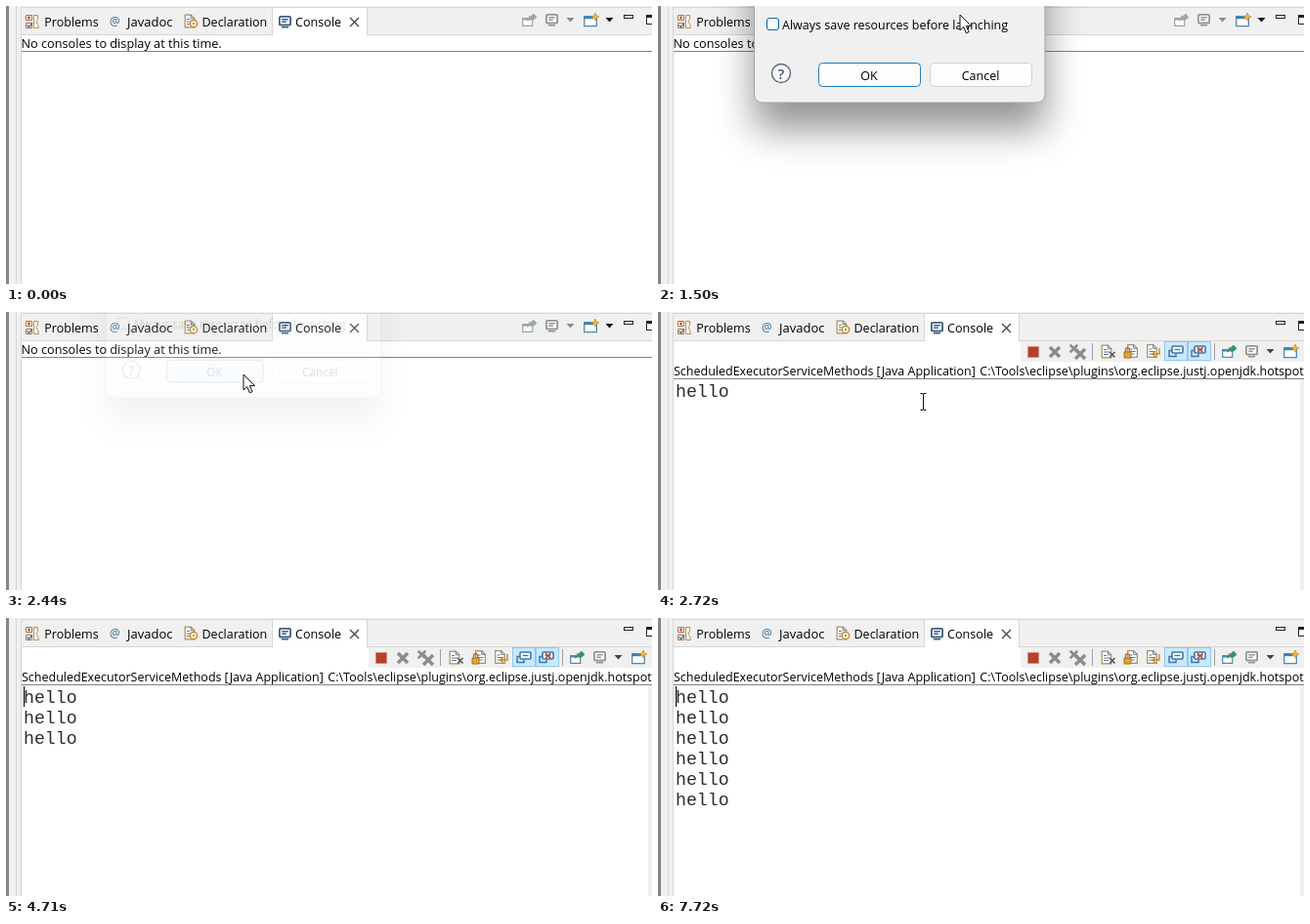
An HTML page for the animation above (8000 ms loop, 661 by 285 pixels).

```html
<!DOCTYPE html>
<html lang="en">
<head>
<meta charset="utf-8">
<title>Console output</title>
<style>
  html, body { margin: 0; width: 100%; height: 100%; overflow: hidden; background: #fff; }
  svg { display: block; }
  text { font: 12.5px "Open Sans", "Noto Sans", sans-serif; fill: #000; white-space: pre; }
  .mono { font: 18.2px "Liberation Mono", monospace; fill: #2c2c2c; }
  .mid { text-anchor: middle; }
  .crisp { shape-rendering: crispEdges; }
  .line { fill: none; stroke-width: 1.4; }
</style>
</head>
<body>
<svg width="661" height="285" viewBox="0 0 661 285">
  <defs>
    <g id="monitor">
      <rect x=".9" y=".9" width="11.2" height="8.6" rx="1" fill="#fff" stroke="currentColor" stroke-width="1.8"/>
      <path d="M3.2 3.7h6.6M3.2 6.3h4.6M3 11.8h7" class="line" stroke="currentColor"/>
    </g>
    <g id="linkedMonitor" color="#3f78a8">
      <rect x="4" y="1" width="11" height="7" rx="1" fill="#fff" stroke="currentColor" stroke-width="1.6"/>
      <path d="M6.5 4.5h6" class="line" stroke="currentColor"/>
      <path d="M4 5.5H1v6h7v-3" fill="none" stroke="currentColor" stroke-width="1.5"/>
    </g>
    <g id="page">
      <path d="M.7 .7h6l3.6 3.6v9H.7z" fill="#fff" stroke="#a88f5c" stroke-width="1.2"/>
      <path d="M6.7 .7v3.6h3.6M2.5 5h3M2.5 7.5h6M2.5 10h5" fill="none" stroke="#55799f"/>
    </g>
    <g id="pin">
      <path d="M.7 4.5h10v7.8H.7z" fill="#fff" stroke="currentColor" stroke-width="1.2"/>
      <path d="M1 5.5h9" stroke="currentColor" stroke-width="2"/>
      <path d="M5 7l3-2M7 2.5l3.5 4M9 3l3-2.5 2.5 3L11.5 6z" fill="var(--head)" stroke="var(--head)" stroke-width="1.2"/>
    </g>
    <g id="newConsole">
      <path d="M.7 2.7h12.6v10H.7z" fill="#fff" stroke="#4f87b0" stroke-width="1.3"/>
      <path d="M1 4h9" stroke="#3f7fae" stroke-width="2.4"/>
      <path d="M12 -1l1.2 2.8L16 3l-2.8 1.2L12 7l-1.2-2.8L8 3l2.8-1.2z" fill="#f0b93a" stroke="#c98a1c" stroke-width=".7"/>
    </g>
    <path id="drop" d="M0 0h8L4 4.5z"/>
    <path id="cross" d="M1 1l10 10M11 1L1 11" stroke="#8c8c8c" stroke-width="3.4"/>
    <path id="smallCross" d="M0 0l5.5 5.5M5.5 0L0 5.5" stroke-width="1.7"/>
  </defs>

  <!-- window frame and tabs -->
  <g class="crisp">
    <path d="M0 0h661v30H16v255H0z" fill="#f0f0f0"/>
    <path d="M0 0h3v285H0z" fill="#858585"/>
    <path d="M10 0h1v285h-1zM15 1h1v284h-1zM15 1h646v1H15zM16 29h645v1H16z" fill="#d6d6d6"/>
    <path d="M272 1h98v29h-98z" fill="#d6d6d6"/>
    <path d="M273 2h96v28h-96z" fill="#fff"/>
    <path d="M632 9h10v4h-10zM655 9h8v10h-8z" fill="#222"/>
    <path d="M633 10h8v2h-8zM656 12h8v6h-8z" fill="#fff"/>
  </g>
  <path d="M20.5 9.5h6v5h-6zM20.5 17.5h6v5h-6z" fill="#fff" stroke="#b5713f"/>
  <path d="M22 12h3M23.5 10.500v3" stroke="#c4552f" stroke-width="1.5"/>
  <path d="M21.500 19.500l2 2 3.500-4" class="line" stroke="#476f9f"/>
  <path d="M28.500 9.500h4v4q-3 2 0 5l1 4h-5z" fill="#fff" stroke="#b8904a"/>
  <text x="39.3" y="21">Problems</text>
  <text x="106" y="20" style="font-size:12px;fill:#2f6c9e">@</text>
  <text x="124" y="21" style="font-size:13px">Javadoc</text>
  <use href="#page" x="182.5" y="8.5"/>
  <circle cx="192" cy="18" r="3.6" fill="#fff" stroke="#c58b24" stroke-width="1.5"/>
  <circle cx="192" cy="18" r="1.2" fill="#c58b24"/>
  <text x="200.5" y="21">Declaration</text>
  <use href="#monitor" x="279" y="10" color="#3f5f80"/>
  <text x="296" y="21" style="font-size:12.6px">Console</text>
  <path d="M352 12l9 9M361 12l-9 9" stroke="#444" stroke-width="1.3"/>

  <g id="empty">
    <g style="--head:#9aa7ae"><use href="#pin" x="528" y="8" color="#9aa3a8"/></g>
    <use href="#monitor" x="552" y="8" color="#949494"/>
    <use href="#drop" x="573.5" y="12" fill="#8a8a8a"/>
    <use href="#newConsole" x="591" y="8"/>
    <use href="#drop" x="613.5" y="12" fill="#111"/>
    <text x="15.5" y="43" style="font-size:12.7px">No consoles to display at this time.</text>
    <path class="crisp" d="M16 46h645v1H16z" fill="#828282"/>
  </g>

  <g id="console">
    <g class="crisp">
      <path d="M16 30h355v21H16z" fill="#fff"/>
      <path d="M371 30h290v21H371zM657 69h4v216h-4z" fill="#f0f0f0"/>
      <path d="M16 68h645v1H16z" fill="#828282"/>
      <path d="M444 32h1v17h-1zM569 32h1v17h-1z" fill="#a0a0a0"/>
      <path d="M518.5 30.5h23v19h-23zM542.5 30.5h23v19h-23z" fill="#cce8ff" stroke="#90c8f6"/>
      <path d="M378 35h12v12h-12z" fill="#d98a78"/>
      <path d="M379 36h10v10h-10z" fill="#b5402c"/>
    </g>
    <use href="#cross" x="400" y="35"/>
    <use href="#cross" transform="translate(421 33) scale(.75)"/>
    <use href="#cross" x="426" y="37"/>
    <use href="#page" x="453.5" y="33.5"/>
    <use href="#smallCross" x="462" y="41" stroke="#5a5a5a"/>
    <use href="#page" x="480" y="33"/>
    <path d="M477 41h7v6h-7z" fill="#e4a43a" stroke="#a9701c"/>
    <path d="M478.5 41v-3q2-3 4 0v3" class="line" stroke="#a9701c"/>
    <use href="#page" x="500" y="33"/>
    <path d="M506 43h7v-6M509 40l-3 3 3 3" class="line" stroke="#c08a28"/>
    <use href="#linkedMonitor" x="522" y="34"/>
    <use href="#linkedMonitor" x="545" y="34"/>
    <use href="#smallCross" x="552" y="36" stroke="#c24c38"/>
    <g style="--head:#38915d"><use href="#pin" x="577" y="34" color="#4f87b0"/></g>
    <use href="#monitor" x="601" y="34" color="#949494"/>
    <use href="#drop" x="622.5" y="38" fill="#444"/>
    <use href="#newConsole" x="640" y="34"/>
    <text y="65"><tspan x="16">ScheduledExecutorServiceMethods</tspan><tspan x="223.5">[Java Application]</tspan><tspan x="329.3">C:\Tools\eclipse\plugins\org.eclipse.justj.openjdk.hotspot</tspan></text>
    <g id="output"></g>
    <path id="caret" class="crisp" d="M18 70h1v21h-1z"/>
  </g>

  <g id="dialog">
    <rect x="98.5" y="-300" width="297.5" height="399" rx="8" fill="#f0f0f0" stroke="#a5a5a5"
          style="filter:drop-shadow(0 27px 19px rgba(0,0,0,.42))"/>
    <rect id="checkbox" x="111.5" y="12.5" width="12" height="12" rx="2.5" fill="#f8f8f8"/>
    <text x="127" y="24">Always save resources before launching</text>
    <circle cx="126" cy="69" r="9.5" fill="#f7f7f7" stroke="#5b6b80" stroke-width="1.4"/>
    <text class="mid" x="126" y="74.5" style="font-size:15px;font-weight:600;fill:#46566d">?</text>
    <rect id="ok" x="164.5" y="58.5" width="104" height="24" rx="4"/>
    <text class="mid" x="216" y="76">OK</text>
    <rect x="278.5" y="58.5" width="104" height="24" rx="4" fill="#fdfdfd" stroke="#d0d0d0"/>
    <text class="mid" x="330" y="76">Cancel</text>
  </g>

  <circle id="halo" cx="243" cy="64" r="13" fill="#f2ee3c" opacity=".72"/>
  <path id="arrow" d="M0 0v16l3.7-3.4 2.7 6.2 2.7-1.2-2.7-6H11.5z" fill="#fff" stroke="#111"/>
  <path id="beam" d="M-3 -8.5h2.5L0 -8l.5-.5H3M0 -8V8M-3 8.5h2.5L0 8l.5 .5H3" fill="none" stroke="#111"/>
</svg>
<script>
const LOOP = 8000;
const $ = id => document.getElementById(id);
const show = (id, on) => $(id).style.display = on ? '' : 'none';
const place = (id, [x, y]) => $(id).setAttribute('transform', `translate(${x} ${y})`);

const CONSOLE_AT = 2720;
const helloTimes = [2720, 3720, 4710, 5720, 6730, 7720];
const caretFlips = [2820, 3310, 3720, 4220, 4710, 5220, 5720, 6220, 6730, 7220, 7720];

// start time, scale, opacity
const dialogPoses = [
  [0, 1, 0], [700, .95, .35], [800, .977, 1], [900, .993, 1], [1000, 1, 1],
  [2310, .98, .65], [2440, .946, .12], [2520, 1, 0]
];

helloTimes.forEach((_, i) => $('output').insertAdjacentHTML('beforeend',
  `<text class="mono" x="18" y="${87 + 21 * i}">hello</text>`));

// eased position between two points, advancing in 100 ms steps
function glide(t, start, end, from, to) {
  const stepped = Math.floor(t / 100) * 100;
  const p = Math.min(1, Math.max(0, (stepped - start) / (end - start)));
  const k = p * p * (3 - 2 * p);
  return from.map((v, i) => v + (to[i] - v) * k);
}

function draw(t) {
  const inConsole = t >= CONSOLE_AT;
  show('empty', !inConsole);
  show('console', inConsole);
  helloTimes.forEach((at, i) => $('output').children[i].style.display = t >= at ? '' : 'none');
  show('caret', caretFlips.filter(at => at <= t).length % 2);

  const [, scale, opacity] = dialogPoses.findLast(pose => pose[0] <= t);
  show('dialog', opacity > 0);
  $('dialog').setAttribute('opacity', opacity);
  $('dialog').setAttribute('transform', `translate(168 -110) scale(${scale}) translate(-168 110)`);

  const tip = t < 2500 ? glide(t, 1500, 2100, [309, 9], [243, 64])
                       : glide(t, 2500, 2900, [243, 64], [300, 120]);
  const moving = t >= 1500;
  const overLabel = moving && tip[1] < 27;
  const overOk = moving && tip[1] >= 58 && tip[0] < 269;
  $('checkbox').setAttribute('stroke', overLabel ? '#0067c0' : '#6a6a6a');
  $('ok').setAttribute('fill', overOk ? '#d9e9f7' : '#fdfdfd');
  $('ok').setAttribute('stroke', overOk ? '#0f62a8' : '#1a7cc8');

  show('halo', t >= 2210 && t < 2310);
  show('arrow', moving && !inConsole);
  place('arrow', tip);
  show('beam', inConsole && t < 3620);
  place('beam', t < 3200 ? tip : glide(t, 3200, 3500, [300, 120], [505, 172]));
}

function tick() {
  draw(performance.now() % LOOP);
  requestAnimationFrame(tick);
}
tick();
</script>
</body>
</html>
```
